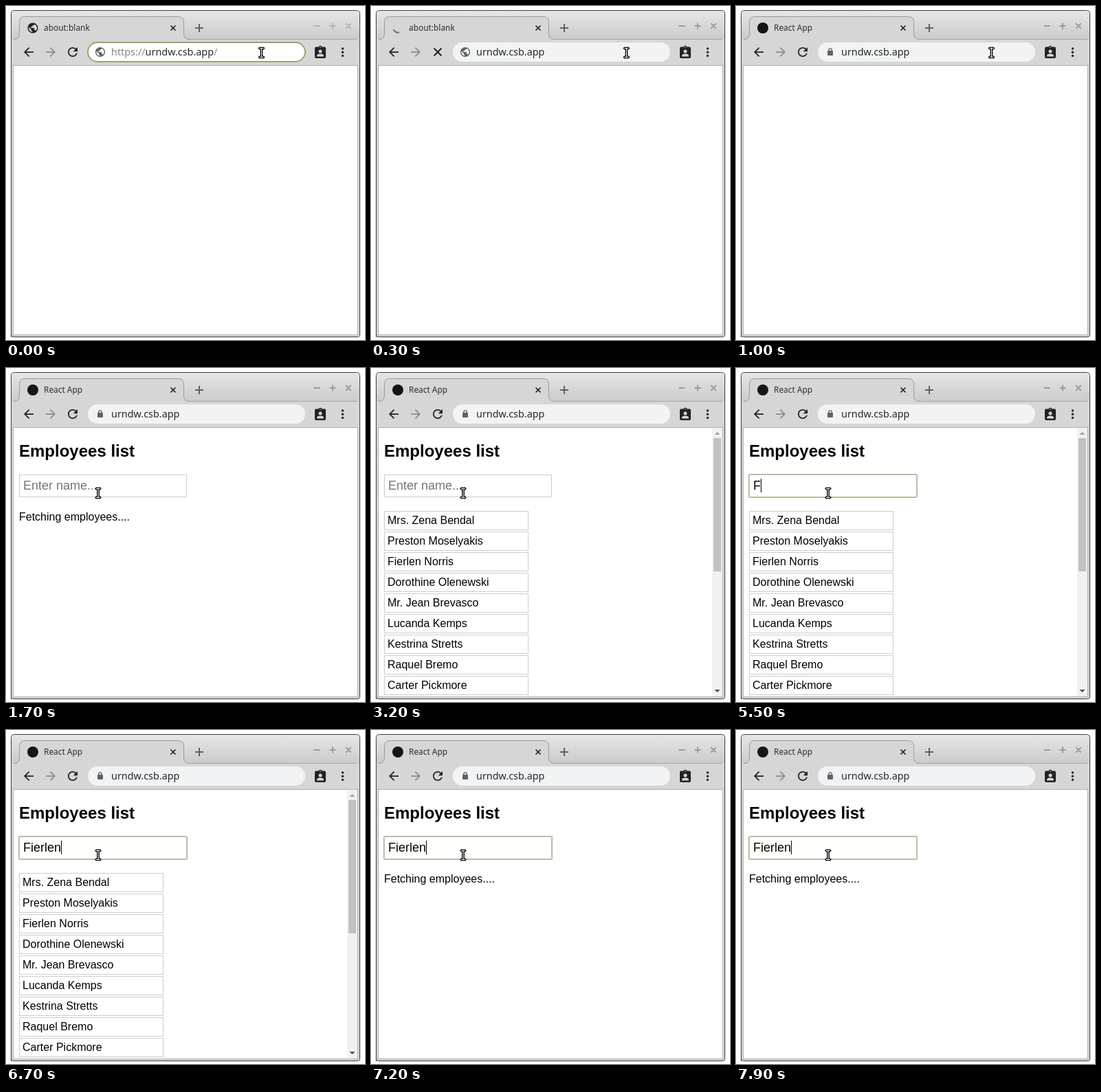
An HTML page that plays this animation: 522 px wide and 486 px high, repeating every 8 s.

```html
<!DOCTYPE html>
<html lang="en">
<head>
<meta charset="utf-8">
<title>Employees list</title>
<style>
  html, body { margin: 0; width: 100%; height: 100%; overflow: hidden; background: #fff; }
  svg { display: block; }
  text { white-space: pre; }
  .ui { font-family: "Noto Sans", "Open Sans", sans-serif; }
  .page { font-family: "Liberation Sans", Arial, sans-serif; font-size: 16px; }
  .stroke { fill: none; stroke-width: 2; }
  .off { display: none; }
</style>
</head>
<body>
<svg width="522" height="486" viewBox="0 0 522 486">
  <defs>
    <linearGradient id="bar" x1="0" y1="0" x2="0" y2="1">
      <stop offset="0" stop-color="#e6e6e6"/>
      <stop offset="1" stop-color="#cbcbcb"/>
    </linearGradient>
    <path id="globe" d="M12 2C6.48 2 2 6.48 2 12s4.48 10 10 10 10-4.48 10-10S17.52 2 12 2zm-1 17.93c-3.95-.49-7-3.85-7-7.93 0-.62.08-1.21.21-1.79L9 15v1c0 1.1.9 2 2 2v1.93zm6.9-2.54c-.26-.81-1-1.39-1.9-1.39h-1v-3c0-.55-.45-1-1-1H8v-2h2c.55 0 1-.45 1-1V7h2c1.1 0 2-.9 2-2v-.41c2.93 1.19 5 4.06 5 7.41 0 2.08-.8 3.97-2.1 5.39z"/>
    <path id="arrow" d="M20 11H7.83l5.59-5.59L12 4l-8 8 8 8 1.41-1.41L7.83 13H20v-2z"/>
  </defs>

  <!-- window -->
  <path d="M7.5 481.5V11.5Q7.5 6.5 12.5 6.5H509.5Q514.5 6.5 514.5 11.5V478.5Q514.5 481.5 511.5 481.5H10.5Q7.5 481.5 7.5 478.5Z" fill="#d6d6d6" stroke="#3c3c3c"/>
  <path d="M8 48V12Q8 7 13 7H509Q514 7 514 12V48Z" fill="url(#bar)"/>
  <path d="M11 48.5H511" stroke="#a6a6a6"/>
  <path d="M11 49V48.5Q19.500 48.500 19.500 40.500V23.500Q19.500 15.500 27.500 15.500H250.500Q258.500 15.500 258.500 23.500V40.500Q258.500 48.500 267 48.500V49Z" fill="#d6d6d6"/>
  <path d="M11 48.5Q19.500 48.500 19.500 40.500V23.500Q19.500 15.500 27.500 15.500H250.500Q258.500 15.500 258.500 23.500V40.500Q258.500 48.500 267 48.500" fill="none" stroke="#999"/>
  <rect x="10" y="86" width="502" height="393" fill="#b0b0b0"/>
  <rect x="11" y="87" width="500" height="391" fill="#fff"/>

  <!-- tab -->
  <use id="tabGlobe" href="#globe" transform="translate(30 23) scale(.75)" fill="#222"/>
  <path id="spinner" class="stroke" d="M32.500 32A6.500 6.500 0 0 1 39 25.500" stroke="#6b6b6b"/>
  <circle id="favicon" cx="39" cy="32" r="8" fill="#151515"/>
  <text id="tabTitle" class="ui" x="55" y="36" font-size="11.9" fill="#2b2b2b"></text>
  <path class="stroke" d="M239.500 28.500l7 7m0-7l-7 7" stroke="#222" style="stroke-width:1.700"/>
  <path class="stroke" d="M275 32h12m-6-6v12" stroke="#606060"/>
  <path id="buttons" class="stroke" d="M447.500 29h9M470.500 29h9m-4.500-4.500v9M494.300 25.300l7.400 7.400m0-7.400l-7.400 7.400"/>

  <!-- toolbar -->
  <use href="#arrow" transform="translate(22.500 56.500) scale(.875)" fill="#222"/>
  <use href="#arrow" transform="translate(75.500 56.500) scale(-.875 .875)" fill="#8b8b8b"/>
  <path id="reload" transform="translate(86.500 56.500) scale(.875)" fill="#222" d="M17.650 6.350C16.200 4.900 14.210 4 12 4c-4.420 0-7.990 3.580-7.990 8s3.570 8 7.990 8c3.730 0 6.840-2.550 7.730-6h-2.080c-.82 2.330-3.040 4-5.650 4-3.310 0-6-2.690-6-6s2.690-6 6-6c1.660 0 3.140.69 4.220 1.780L13 11h7V4l-2.350 2.350z"/>
  <path id="stop" class="stroke" d="M91.500 61.500l11 11m0-11l-11 11" stroke="#222"/>
  <rect id="pill" x="119" y="53" width="316" height="28" rx="14" fill="#f1f3f4"/>
  <rect id="pillFocus" x="119" y="53" width="316" height="28" rx="14" fill="#fff" stroke="#8fac70" stroke-width="2"/>
  <use id="urlGlobe" href="#globe" transform="translate(128.600 58.600) scale(.7)" fill="#5f6368"/>
  <g id="lock">
    <rect x="133" y="65" width="8" height="7" rx="1" fill="#5f6368"/>
    <path d="M134.800 66v-2a2.200 2.200 0 0 1 4.400 0v2" fill="none" stroke="#5f6368" stroke-width="1.300"/>
  </g>
  <text class="ui" x="153" y="72" font-size="14.4" fill="#26292c"><tspan id="scheme" fill="#858585">https://</tspan>urndw.csb.app<tspan id="slash" fill="#858585">/</tspan></text>
  <rect x="449" y="59.500" width="16" height="16.500" rx="2" fill="#222"/>
  <circle cx="457" cy="60" r="2.300" fill="#222"/>
  <circle cx="457" cy="60.300" r=".8" fill="#d6d6d6"/>
  <circle cx="457" cy="66" r="2.500" fill="#d6d6d6"/>
  <path d="M452 73.500v-1q0-3 5-3t5 3v1z" fill="#d6d6d6"/>
  <g fill="#222"><circle cx="489.500" cy="62" r="1.700"/><circle cx="489.500" cy="67.200" r="1.700"/><circle cx="489.500" cy="72.400" r="1.700"/></g>

  <!-- page -->
  <g id="page" class="page">
    <text x="19" y="129" font-size="24" font-weight="700">Employees list</text>
    <rect x="19.500" y="155.500" width="243" height="32" fill="#fff" stroke="#ccc"/>
    <g id="focus" fill="none">
      <rect x="18.500" y="154.500" width="245" height="34" rx="1" stroke="#a9be97"/>
      <rect x="19.500" y="155.500" width="243" height="32" stroke="#bac9ae"/>
    </g>
    <text id="hint" x="25" y="177" font-size="18" fill="#757575">Enter name...</text>
    <text id="typed" x="25" y="177" font-size="18"></text>
    <rect id="caret" y="161" width="1" height="20"/>
    <text id="fetching" x="19" y="222">Fetching employees....</text>
    <g id="list">
      <g id="rows"></g>
      <rect x="496" y="87" width="15" height="391" fill="#f1f1f1"/>
      <rect x="498" y="102" width="11" height="194" fill="#c1c1c1"/>
      <path d="M499.500 97h8l-4-4z" fill="#a3a3a3"/>
      <path d="M499.500 468h8l-4 4z" fill="#505050"/>
    </g>
  </g>

  <!-- pointer -->
  <g id="beam" fill="none" stroke-linecap="round" stroke-linejoin="round">
    <path id="beamShape" d="M-2.700 -6.500H-1.500Q0 -6.500 0 -5.500Q0 -6.500 1.500 -6.500H2.700M0 -5.500V5.500M-2.700 6.500H-1.500Q0 6.500 0 5.500Q0 6.500 1.500 6.500H2.700" stroke="#000" stroke-width="3.400"/>
    <use href="#beamShape" style="stroke:#fff"/>
    <path d="M-2.700 -6.500H2.700M0 -6.500V6.500M-2.700 6.500H2.700" stroke="#fff" stroke-width="1.100"/>
  </g>
  <path id="pointer" d="M0 0V16L3.800 12.500L6.400 18.500L9 17.400L6.400 11.600H11.500Z" fill="#fff" stroke="#000"/>
</svg>
<script>
  const LOOP = 8000;
  const STEP = 100;
  const PEOPLE = [
    "Mrs. Zena Bendal", "Preston Moselyakis", "Fierlen Norris",
    "Dorothine Olenewski", "Mr. Jean Brevasco", "Lucanda Kemps",
    "Kestrina Stretts", "Raquel Bremo", "Carter Pickmore"
  ];
  const QUERY = "Fierlen";
  const KEYS = [5500, 5600, 5900, 6200, 6300, 6500, 6700];
  const ADVANCE = [0, 11, 15, 25, 31, 35, 45, 55];

  const $ = id => document.getElementById(id);
  const show = (id, on) => $(id).classList.toggle("off", !on);
  const within = (t, a, b) => t >= a && t < b;
  const place = (id, x, y) => $(id).setAttribute("transform", `translate(${x} ${y})`);

  $("rows").innerHTML = PEOPLE.map((name, i) => {
    const y = 208 + 30 * i;
    return `<rect x="19.5" y="${y + 0.5}" width="209" height="27" fill="#fff" stroke="#ccc"/>
      <text x="24" y="${y + 19}">${name}</text>`;
  }).join("");

  function bezier(u, a, b, c, d) {
    const v = 1 - u;
    return a * v * v * v + 3 * b * v * v * u + 3 * c * v * u * u + d * u * u * u;
  }

  function drawBrowser(t) {
    const start = t < 100;
    const loading = within(t, 100, 800);
    show("tabGlobe", start || within(t, 800, 1000));
    show("spinner", loading);
    $("spinner").setAttribute("transform", `rotate(${-t * 0.36} 39 32)`);
    show("favicon", t >= 1000);
    $("tabTitle").textContent = t < 800 ? "about:blank" : "React App";
    $("buttons").setAttribute("stroke", start ? "#b2b2b2" : "#9a9a9a");
    show("reload", !loading);
    show("stop", loading);
    for (const id of ["pillFocus", "scheme", "slash"]) show(id, start);
    show("pill", !start);
    show("urlGlobe", t < 800);
    show("lock", t >= 800);
  }

  function drawPage(t) {
    const count = KEYS.filter(k => t >= k).length;
    const listed = within(t, 3200, 7200);
    show("page", t >= 1200);
    show("fetching", !listed);
    show("list", listed);
    show("focus", t >= 4400);
    show("hint", !count);
    $("typed").textContent = QUERY.slice(0, count);
    $("caret").setAttribute("x", 25 + ADVANCE[count]);
    show("caret", within(t, 4400, 5000) || within(t, 5500, 7300) || t >= 7900);
  }

  function drawCursor(t) {
    const u = Math.min(1, Math.max(0, (t - 1000) / 700));
    const moving = u > 0 && u < 1;
    const x = bezier(u, 371.5, 345, 150, 134);
    const y = bezier(u, 68, 250, 350, 182);
    show("beam", !moving);
    show("pointer", moving);
    place("beam", x, y);
    place("pointer", x, y);
  }

  function frame(now) {
    const t = Math.floor((now % LOOP) / STEP) * STEP;
    drawBrowser(t);
    drawPage(t);
    drawCursor(t);
    requestAnimationFrame(frame);
  }
  frame(performance.now());
</script>
</body>
</html>
```
